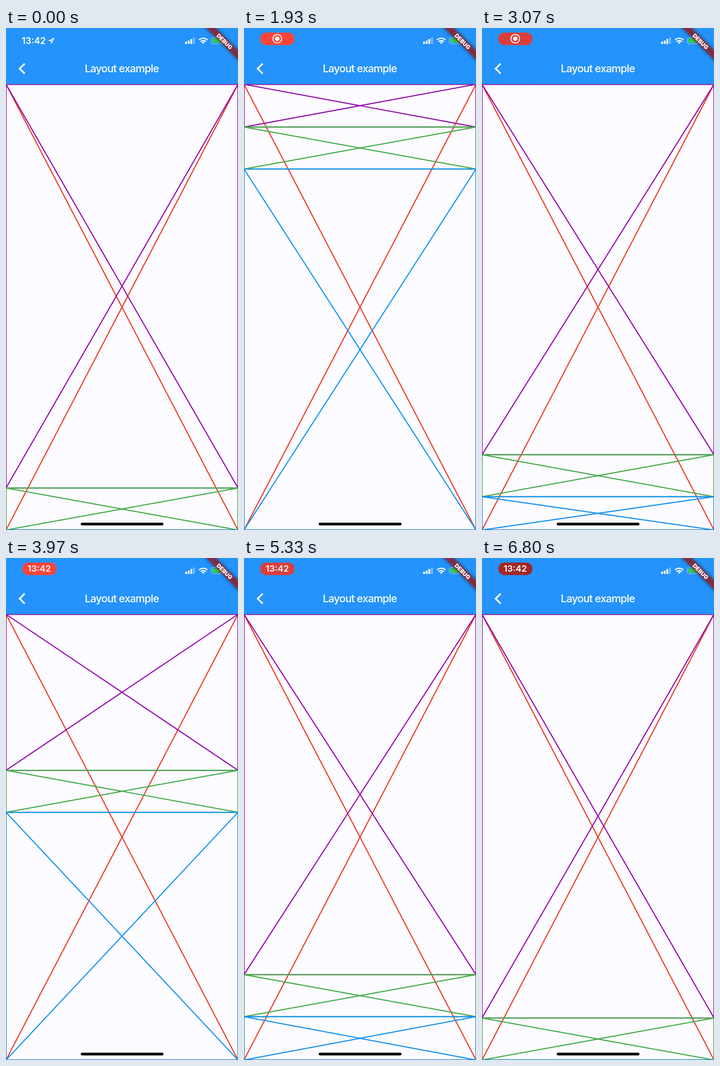
Animation, 509 px wide and 1100 px high, one loop 6.83 s. Source, as an HTML page:

```html
<!DOCTYPE html>
<html lang="en">
<head>
<meta charset="utf-8">
<title>Layout example</title>
<style>
  html, body { margin: 0; width: 100%; height: 100%; overflow: hidden; background: #fcfbff; }
  svg { display: block; width: 100vw; height: 100vh; }
  text { font-family: Inter, Roboto, sans-serif; fill: #fff; text-anchor: middle; }
  .box { fill: none; stroke-width: 2.4; }
</style>
</head>
<body>
<svg viewBox="0 0 509 1100" preserveAspectRatio="none">
  <defs>
    <linearGradient id="shade" x2="0" y2="1">
      <stop offset="0" stop-color="#203080" stop-opacity=".09"/>
      <stop offset="1" stop-color="#203080" stop-opacity="0"/>
    </linearGradient>
    <filter id="blur" x="-30%" y="-100%" width="160%" height="300%">
      <feGaussianBlur stdDeviation="4"/>
    </filter>
  </defs>

  <rect width="509" height="1100" fill="#fcfbff"/>
  <path id="red" class="box" stroke="#eb3a24"/>
  <path id="purple" class="box" stroke="#920aac"/>
  <path id="green" class="box" stroke="#45ac4b"/>
  <path id="blue" class="box" stroke="#1592f0"/>
  <rect y="123" width="509" height="7" fill="url(#shade)"/>
  <rect width="509" height="123" fill="#2493fb"/>

  <text x="254" y="97" font-size="23.3" font-weight="500" letter-spacing="-.9">Layout example</text>
  <path d="M41 78 30 89l11 11" fill="none" stroke="#fff" stroke-width="3.7"/>

  <g id="plain">
    <text x="61" y="35" font-size="19.8" font-weight="600">13:42</text>
    <path d="M94 27.6 105.2 22.2 99.8 33.4V27.6Z" fill="none" stroke="#fff" stroke-width="1.6" stroke-linejoin="round"/>
  </g>
  <g id="pill">
    <rect id="pillBg" x="36" y="10" width="74.5" height="27.5" rx="12.5"/>
    <g id="rec">
      <circle cx="73" cy="23.5" r="9.6" fill="none" stroke="#fff" stroke-width="2"/>
      <circle cx="73" cy="23.5" r="5" fill="#fff"/>
    </g>
    <text id="clock" x="73" y="30" font-size="19.2" font-weight="600">13:42</text>
  </g>

  <g fill="#fff">
    <rect x="393" y="30" width="4" height="5" rx="1"/>
    <rect x="398.8" y="27.5" width="4" height="7.5" rx="1"/>
    <rect x="404.6" y="24" width="4" height="11" rx="1"/>
    <rect x="410.4" y="20.5" width="4" height="14.5" rx="1" opacity=".4"/>
  </g>
  <g fill="none" stroke="#fff" stroke-width="2.7">
    <path d="M423.6 26.2a13.3 13.3 0 0 1 18.4 0"/>
    <path d="M427 29.9a8.4 8.4 0 0 1 11.6 0"/>
    <path d="M429.6 31.6a5 5 0 0 1 6.4 0L432.8 34.9Z" fill="#fff" stroke="none"/>
  </g>
  <rect x="450.6" y="20.6" width="27" height="14" rx="4" fill="none" stroke="#fff" stroke-opacity=".5" stroke-width="1.2"/>
  <rect x="452.6" y="22.6" width="21" height="10" rx="2.2" fill="#33d158"/>
  <path d="M479 25.3q2.4 2.3 0 4.6Z" fill="#fff" opacity=".5"/>

  <g transform="translate(509 0) rotate(45)">
    <rect x="-60" y="34.4" width="120" height="14.8" filter="url(#blur)" opacity=".5"/>
    <rect x="-60" y="34.4" width="120" height="14.8" fill="#b71c1c" fill-opacity=".63"/>
    <text y="46.3" font-size="12.4" font-weight="900">DEBUG</text>
  </g>

  <rect x="164" y="1084" width="181.5" height="6" rx="3" fill="#000"/>
</svg>
<script>
const LOOP = 6830, W = 509, H = 1100, TOP = 123.4, BAR = 92;
const $ = id => document.getElementById(id);

// drag stops: time in ms, y of the divider
const stops = [[0, 1008], [1030, 1008], [1930, 217], [3070, 935],
               [4530, 244], [5330, 913], [6100, 1008], [LOOP, 1008]];

const ease = u => (1 - Math.cos(Math.PI * u)) / 2;
const clamp = u => Math.min(1, Math.max(0, u));
const mix = (a, b, u) => a + (b - a) * u;

function dividerAt(t) {
  const i = stops.findIndex(s => s[0] > t);
  const [t0, y0] = stops[i - 1], [t1, y1] = stops[i];
  return mix(y0, y1, ease((t - t0) / (t1 - t0)));
}

function crossBox(id, y0, y1) {
  $(id).setAttribute('d', `M0 ${y0}H${W}V${y1}H0ZL${W} ${y1}M${W} ${y0}L0 ${y1}`);
}

function pillColor(t) {
  const glow = clamp(0.5 - 0.62 * Math.cos(2 * Math.PI * (t - 1030) / 2150));
  const press = clamp((t - 6600) / 150);
  const dim = [218, 62, 58], bright = [255, 69, 58], pressed = [160, 40, 40];
  return `rgb(${dim.map((c, i) => mix(mix(c, bright[i], glow), pressed[i], press))})`;
}

function draw(t) {
  const y = dividerAt(t);
  crossBox('red', TOP, H);
  crossBox('purple', TOP, y);
  crossBox('green', y, y + BAR);
  crossBox('blue', y + BAR, H);

  const shown = clamp((t - 400) / 200), timed = clamp((t - 3700) / 200);
  $('plain').style.opacity = 1 - shown;
  $('pill').style.opacity = shown;
  $('pillBg').style.fill = pillColor(t);
  $('rec').style.opacity = 1 - timed;
  $('clock').style.opacity = timed;
}

const start = performance.now();
function tick() {
  draw((performance.now() - start) % LOOP);
  requestAnimationFrame(tick);
}
tick();
</script>
</body>
</html>
```
